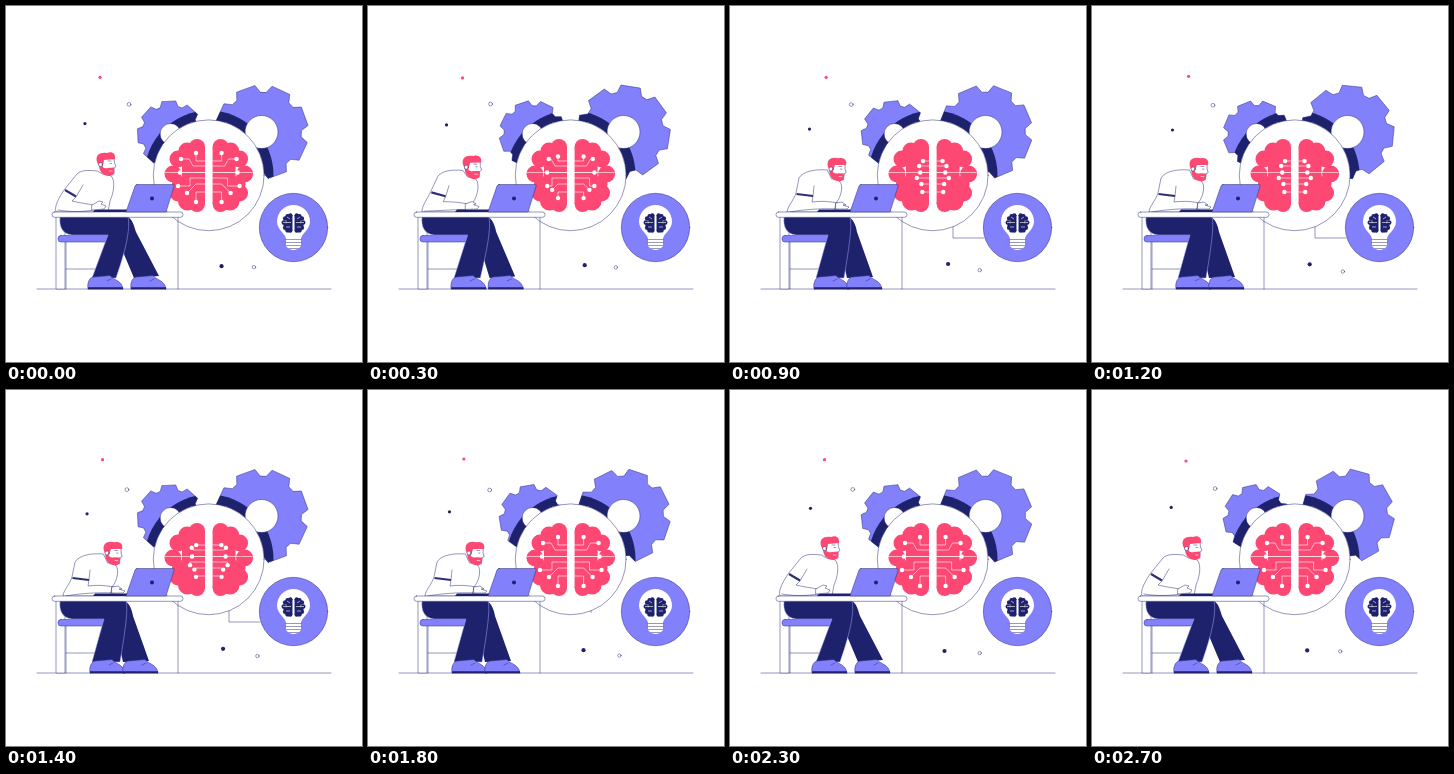
An HTML page for the animation above (2.8 s loop, 356 px wide and 356 px high).

```html
<!DOCTYPE html>
<html lang="en">
<head>
<meta charset="utf-8">
<style>
html, body { margin: 0; width: 100%; height: 100%; overflow: hidden; background: #fff; }
svg { display: block; width: 100vw; height: 100vh; }
.line { fill: none; stroke: #2b2f78; stroke-width: .5; stroke-linejoin: round; stroke-linecap: round; }
.white { fill: #fff; }
.purple { fill: #8280fb; }
.navy { fill: #1e226d; }
.pink { fill: #fc4873; }
.trace { fill: none; stroke: #fff; stroke-width: .6; stroke-linejoin: round; }
</style>
</head>
<body>
<svg viewBox="0 0 356 356">
  <defs>
    <g id="lobes">
      <rect x="176" y="141" width="23" height="57"/>
      <circle cx="191" cy="141" r="8"/><circle cx="181" cy="145" r="8.5"/>
      <circle cx="172" cy="153" r="8.500"/><circle cx="167" cy="168" r="8.500"/>
      <circle cx="174" cy="178" r="8"/><circle cx="172" cy="187" r="8.500"/>
      <circle cx="181.500" cy="195" r="9.500"/><circle cx="191" cy="198" r="8"/>
    </g>
    <g id="brain">
      <use href="#lobes"/>
      <use href="#lobes" transform="translate(405.6) scale(-1 1)"/>
    </g>
    <clipPath id="gearClip">
      <path id="clipSmall" clip-rule="evenodd"/>
      <path id="clipBig" clip-rule="evenodd"/>
    </clipPath>
  </defs>

  <path class="line" d="M31 283H325"/>

  <path id="small" class="line purple" fill-rule="evenodd"/>
  <path id="big" class="line purple" fill-rule="evenodd"/>
  <circle class="navy" cx="203" cy="169" r="64.5" clip-path="url(#gearClip)"/>
  <circle class="line white" cx="202.7" cy="169.3" r="55.4"/>

  <use href="#brain" class="pink"/>
  <g id="half"><path class="trace" d="M159 166.500H199"/></g>
  <use href="#half" transform="translate(405.6) scale(-1 1)"/>

  <path id="link" class="line" pathLength="1" stroke-dasharray="1" d="M223 221V232H254"/>

  <circle class="line purple" cx="287.5" cy="221.5" r="34.2"/>
  <path class="white" d="M280 233C280 228 271 224 271 215.500A16.500 16.500 0 0 1 304 215.500C304 224 295 228 295 233V240Q292 244 287.500 244T280 240Z"/>
  <path class="line" d="M280 233.500H295M280 236.500H295M280.500 239.500H294.500M283 242.500H292"/>
  <use href="#brain" class="navy" transform="translate(287.5 217) scale(.27) translate(-202.8 -169.5)"/>
  <path class="trace" d="M277 216.500H285M298 216.500H290M281 211L284 213M294 211L291 213M280 221H284M295 221H291"/>

  <path class="line white" d="M50 211V283H59V211M172 211V283"/>
  <path class="line" d="M60 236V283M60 263H89"/>
  <rect class="line purple" x="52" y="229.5" width="52" height="6.5" rx="3"/>
  <path id="farLeg" class="navy"/>
  <path id="nearLeg" class="navy" stroke="#a9a8fb" stroke-width=".5"/>
  <g id="shoes"></g>

  <path id="torso" class="line white"/>
  <path id="arm" class="line"/>
  <path id="cuff" class="line" style="stroke-width:2.2;stroke-linecap:butt"/>
  <g id="head">
    <path class="line white" d="M95 152H108L108.500 157L110 160.500L108 162V168H98Z"/>
    <path class="pink" d="M91 156C89 149 94 146 101 147C106 145 110 148 109 153L98 154L97 160H93Z"/>
    <path class="pink" d="M95.500 158C96 162 99 163 102 162L108 161.500C109 166 108 170 103 170C97 170 92.500 165 93 158Z"/>
    <circle class="line white" cx="94.5" cy="158.5" r="2"/>
    <path class="line" d="M102 155H105M104 157.500H105.500"/>
    <path class="trace" d="M103 165H106.500"/>
  </g>

  <rect class="line white" x="46" y="206" width="131" height="5.3" rx="2.6"/>
  <path class="navy" d="M89 203.500H121V206H87Z"/>
  <path id="hand" class="line white"/>
  <path class="line purple" d="M131 178.500H167Q169 178.500 168 180.500L160 206H120L129 180Q129.500 178.500 131 178.500Z"/>
  <circle class="navy" cx="146" cy="192.5" r="2"/>

  <g id="specks"></g>
</svg>
<script>
const LOOP = 2800, STEP = 100, TAU = Math.PI * 2;
const $ = id => document.getElementById(id);

function add(parent, tag, attrs) {
  const el = document.createElementNS('http://www.w3.org/2000/svg', tag);
  for (const key in attrs) el.setAttribute(key, attrs[key]);
  return $(parent).appendChild(el);
}

const ramp = (t, from, to) => {
  const k = Math.min(1, Math.max(0, (t - from) / (to - from)));
  return k * k * (3 - 2 * k);
};

// Blends two path strings that share the same commands
function blend(a, b, k) {
  const ends = b.match(/[\d.]+/g);
  let i = 0;
  return a.replace(/[\d.]+/g, n => (+n + (ends[i++] - n) * k).toFixed(2));
}

// Eight broad teeth with narrow valleys around a round hole
function gearPath(cx, cy, outer, root, hole, turn) {
  const points = [];
  for (let i = 0; i < 8; i++)
    for (const [offset, r] of [[-18, root], [-12, outer], [12, outer], [18, root]]) {
      const a = (turn + i * 45 + offset) * TAU / 360;
      points.push((cx + r * Math.cos(a)).toFixed(2) + ' ' + (cy + r * Math.sin(a)).toFixed(2));
    }
  return `M${points.join('L')}ZM${cx - hole} ${cy}a${hole} ${hole} 0 1 0 ${2 * hole} 0a${hole} ${hole} 0 1 0 ${-2 * hole} 0Z`;
}

// Upright and leaning shapes
const poses = {
  torso: ['M91 165C82 164 75 164 71 168L58 184C53 192 48 200 50 206L102 206L104 195C108 186 109 176 106 171C103 168 100 168 97 168Z',
          'M97 164C86 163 73 165 69 172L66 187C64 194 57 201 57 206L104 206L106 197C112 190 113 179 110 176C108 173 105 173 102 173Z'],
  arm: ['M77 179L70 191L66 195C74 197 82 198 88 199M52 204C62 206 78 206 88 204',
        'M84 180L83 190L82 196C90 195 98 195 108 197M60 206C70 204 90 202 108 203'],
  cuff: ['M59 184L70 190.5', 'M66.5 188L83 190'],
  hand: ['M86 199L93 195L97 196L95 198L100 200L98 203L86 204Z',
         'M106 197L112 196L116 199L113 199L119 201L117 203L106 203Z'],
  nearLeg: ['M54 211L122 211C124 220 122 238 110 272L86 272L102 229L66 229C56 228 53 220 54 211Z',
            'M54 211L120 211C122 220 120 236 114 272L86 272L98 229L66 229C56 228 53 220 54 211Z'],
  farLeg: ['M95 211L122 211C127 214 128 220 130 226L153 270L128 272L112 234Z',
           'M95 211L119 211C124 214 126 220 127 226L143 271L117 272L108 232Z']
};

const shoes = [[0, 2], [43, 35]].map(shift => {
  const el = add('shoes', 'g', {});
  el.innerHTML = '<path class="line purple" d="M82 283C81 277 83 272 87 271L104 269.500C107 274 116 274 117 283Z"/>' +
    '<path class="navy" d="M82 281.300H117V283H82Z"/><path class="line" d="M101 275L105 273"/>';
  return { el, shift };
});

const traces = ['M199 155H190V147', 'M199 160H187L183 153H175', 'M199 166.5H174',
                'M199 172H184V180H172', 'M199 178H190L181 187', 'M199 186H190V196'].map(d => {
  const path = add('half', 'path', { d, class: 'trace' });
  const length = path.getTotalLength();
  return { path, length, dot: add('half', 'circle', { r: 2.2, fill: '#fff' }) };
});

// Centre, swing and time of the furthest point, for x then y
const specks = [
  ['pink', 1.6, 95.3, 1.3, 1300, 70.5, 1.5, 450],
  ['navy', 1.6, 80, 1.5, 1750, 120.7, 3.3, 1250],
  ['line', 1.9, 122, 1.1, 2650, 99, 1, 1800],
  ['navy', 2.1, 216.3, 1.8, 900, 259.5, 1.5, 2300],
  ['line', 1.7, 249.7, 1.9, 1600, 263.6, 2.5, 1500]
].map(([kind, r, ...path]) => ({ el: add('specks', 'circle', { class: kind, r }), path }));

const swing = (t, mid, size, peak) => mid + size * Math.cos(TAU * (t - peak) / LOOP);

function draw(t) {
  const turn = 270 * t / LOOP;
  const small = gearPath(164.5, 128, 33.5, 28.5, 10.5, turn - 93);
  const big = gearPath(255.5, 126, 47, 40, 16.5, turn - 65);
  for (const id of ['small', 'clipSmall']) $(id).setAttribute('d', small);
  for (const id of ['big', 'clipBig']) $(id).setAttribute('d', big);

  const lean = ramp(t, 50, 500) - ramp(t, 1800, 2300);
  for (const id in poses) $(id).setAttribute('d', blend(...poses[id], lean));
  $('head').setAttribute('transform', `translate(${6.5 * lean} ${5 * lean}) rotate(${6 * lean} 99 158)`);
  for (const { el, shift: [a, b] } of shoes) el.setAttribute('transform', `translate(${a + (b - a) * lean})`);

  const reach = 1 - .65 * (ramp(t, 0, 800) - ramp(t, 1200, 1800));
  for (const { path, length, dot } of traces) {
    const p = path.getPointAtLength(length * reach);
    path.setAttribute('stroke-dasharray', `${length * reach} ${length}`);
    dot.setAttribute('cx', p.x);
    dot.setAttribute('cy', p.y);
  }

  const link = ramp(t, 500, 900) - ramp(t, 1400, 1850);
  $('link').style.visibility = link > 0 ? 'visible' : 'hidden';
  $('link').setAttribute('stroke-dashoffset', 1 - link);

  for (const { el, path } of specks) {
    el.setAttribute('cx', swing(t, ...path.slice(0, 3)));
    el.setAttribute('cy', swing(t, ...path.slice(3)));
  }
}

const start = performance.now();
function tick() {
  const t = (performance.now() - start) % LOOP;
  draw(Math.floor(t / STEP) * STEP);
  requestAnimationFrame(tick);
}
tick();
</script>
</body>
</html>
```
